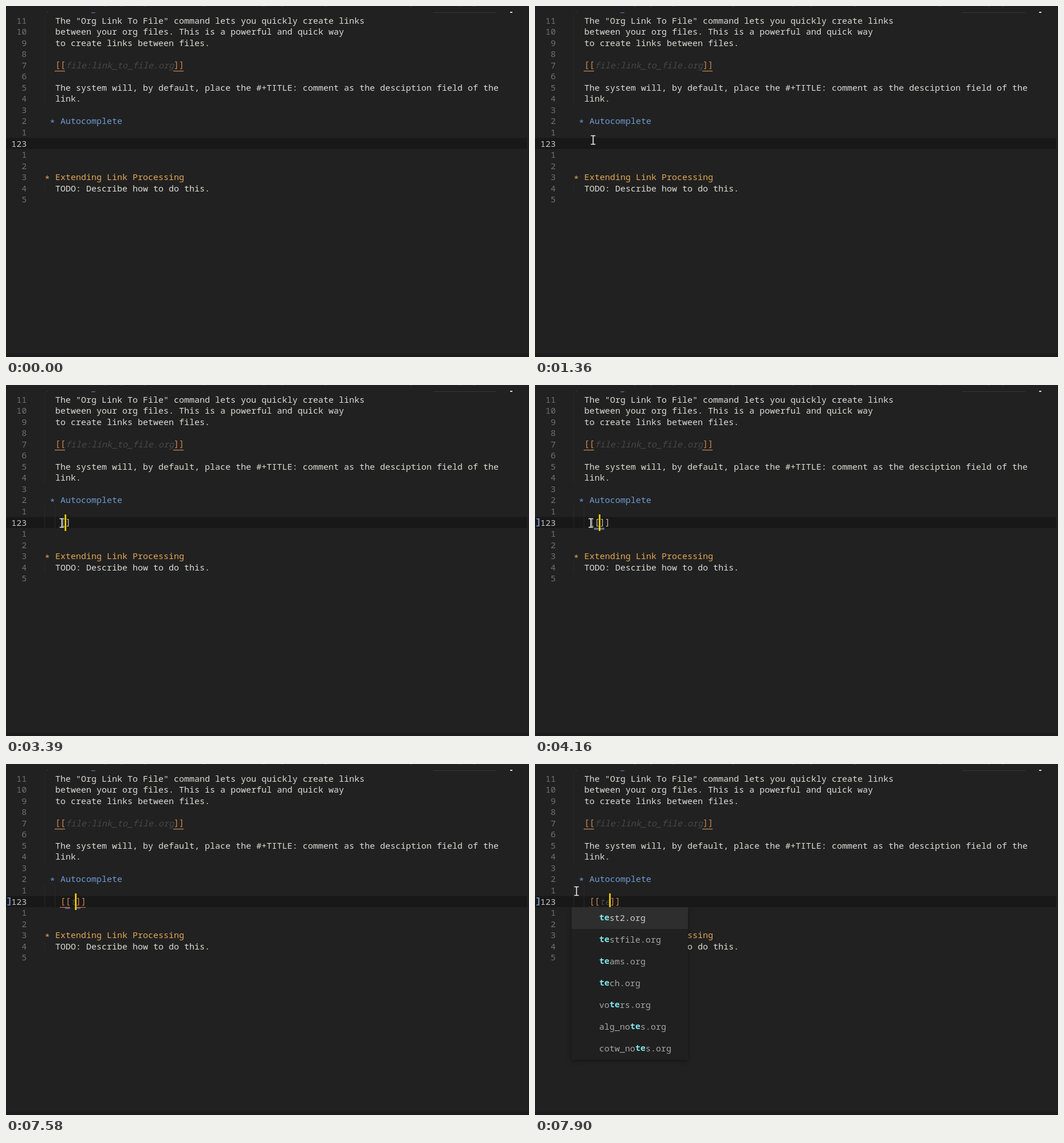
Recreate the animation shown at these times as an HTML page with a canvas. Size 913x613 px, loop 8 s.

```html
<!DOCTYPE html>
<html lang="en">
<head>
<meta charset="utf-8">
<title>Org link autocomplete</title>
<style>
html, body { margin: 0; width: 100%; height: 100%; overflow: hidden; background: #212121; }
canvas { display: block; }
</style>
</head>
<body>
<canvas id="stage" width="913" height="613"></canvas>
<script>
const ctx = document.getElementById('stage').getContext('2d');
const LOOP = 8000, CHAR = 9, LEFT = 68, ROW = 19.55, TOP = 15.4;
const FACE = '15px "Noto Sans Mono", "DejaVu Sans Mono", monospace';
const C = {
  bg: '#212121', line: '#181818', text: '#dcdcd8', num: '#707070', now: '#c6c6c6',
  blue: '#6f9ad3', gold: '#e3a857', link: '#d08a50', dim: '#484848', guide: '#2b2b2b',
  caret: '#ffd900', pair: '#c9c3b0', match: '#6f8fd8', hit: '#80e9ef', item: '#a6a6a6',
  mark: '#8099dc', warn: '#c4714c'
};

// Column, text, colour
const lines = [
  [2, 'The "Org Link To File" command lets you quickly create links', C.text],
  [2, 'between your org files. This is a powerful and quick way', C.text],
  [2, 'to create links between files.', C.text],
  null, null, null,
  [2, 'The system will, by default, place the #+TITLE: comment as the desciption field of the', C.text],
  [2, 'link.', C.text],
  null,
  [1, '* Autocomplete', C.blue],
  null, null, null, null,
  [0, '* Extending Link Processing', C.gold],
  [2, 'TODO: Describe how to do this.', C.text],
  null
];
const CUR = 11;

// Pointer stops: time, x, y. The pointer holds each place until the next.
const path = [
  [230, 497, 435], [300, 444.5, 415.5], [530, 350, 330], [590, 296, 289.5],
  [820, 130, 212], [900, 69, 190], [1130, 42, 200], [1200, 15, 214],
  [1280, 70, 228], [1360, 101, 234], [1440, 104, 237], [1520, 102, 239],
  [1600, 99, 240], [1680, 97, 241],
  [5430, 90, 235], [5500, 82, 228], [5570, 76, 224], [5640, 72, 222]
];

const wide = ['test2.org', 'testfile.org', 'teams.org', 'tech.org', 'todo.org', 'talks.org',
  'voters.org', 'alg_notes.org', 'org_mode_publishing_script.org', 'cotw_notes.org'];
const narrow = wide.filter(s => s.includes('te'));

const colX = c => LEFT + c * CHAR;
const rowY = r => TOP + r * ROW;
const baseY = r => rowY(r) + 15.1;

function box(x, y, w, h, color) {
  ctx.fillStyle = color;
  ctx.fillRect(x, y, w, h);
}

function write(s, x, y, color, style = '300') {
  ctx.font = style + ' ' + FACE;
  ctx.fillStyle = color;
  ctx.fillText(s, x, y);
}

function put(s, col, row, color, style) {
  write(s, colX(col), baseY(row), color, style);
}

// Stars sit on the middle of the line.
function putLine(col, s, color, row) {
  const star = s.startsWith('*');
  if (star) write('*', colX(col) - 0.5, baseY(row) + 3, color);
  put(star ? s.slice(1) : s, col + star, row, color);
}

function brackets(s, col, row, color) {
  write(s, colX(col), baseY(row) - 1.4, color);
}

function under(col, count, y, color) {
  box(colX(col) - 1, y, count * CHAR, 1.2, color);
}

function guide(col, row, count) {
  box(colX(col) - 0.8, rowY(row), 1, count * ROW, C.guide);
}

function page() {
  box(0, 0, 913, 613, C.bg);
  box(0, 607, 913, 6, '#1c1c1c');
  box(0, rowY(CUR), 909.5, ROW, C.line);
  box(912, 0, 1, 613, '#191919');
  for (const x of [172, 200, 240, 344, 448, 480, 556, 705, 790, 815])
    box(x, 0, 4, 1, '#3a3a3a');
  box(71, 10, 2, 2, '#303030');
  box(149, 11, 7, 1.5, '#4c678b');
  box(746, 11, 110, 1, '#373737');
  box(880, 10, 4, 2, '#d8d8d8');

  guide(0, 0, 8);
  guide(0, 15, 1);
  lines.forEach((l, r) => {
    const n = String(r === CUR ? 123 : Math.abs(CUR - r));
    write(n, 36.3 - n.length * CHAR, baseY(r), r === CUR ? C.now : C.num);
    if (l) putLine(...l, r);
  });
  brackets('[[', 2, 4, C.link);
  put('file:link_to_file.org', 4, 4, C.dim, 'italic 300');
  brackets(']]', 25, 4, C.link);
  under(2, 2, 113, C.link);
  under(25, 2, 113, C.link);
}

function bar(col) {
  box(colX(col) - 1.5, 226, 2.6, 29, C.caret);
}

function gutterMark() {
  box(5.6, 233, 2, 14, C.mark);
  box(2.6, 233, 3, 1.6, C.mark);
  box(2.6, 245.4, 3, 1.6, C.mark);
}

function entry(t) {
  if (t < 1840) return;
  if (t < 2610) {
    ctx.strokeStyle = '#a28b13';
    ctx.lineWidth = 1.2;
    ctx.strokeRect(94.6, 232, 8, 18);
    return;
  }
  if (t < 3390) return bar(3);

  guide(0, 10, 2);
  guide(2, 10, 2);
  if (t >= 3620) gutterMark();

  if (t < 3850) {
    brackets('[]', 3, CUR, C.pair);
    if (t >= 3710) under(3, 2, 251, C.match);
    bar(4);
  } else if (t < 7580) {
    brackets('[[]]', 3, CUR, C.pair);
    if (t < 4160) under(3, 2, 251, C.match);
    else {
      under(4, 2, 249.6, '#9c9682');
      under(4, 2, 251.4, C.match);
    }
    bar(5);
  } else {
    const typed = t < 7810 ? 't' : 'te', end = 5 + typed.length;
    brackets('[[', 3, CUR, C.link);
    put(typed, 5, CUR, C.dim, 'italic 300');
    brackets(']]', end, CUR, C.link);
    under(3, 2, 249.8, C.warn);
    under(end, 2, 249.8, C.warn);
    under(4, 1, 251.4, C.match);
    under(end, 1, 251.4, C.match);
    bar(end);
  }
}

function popup(items, key, right) {
  const x = 64, y = 250, h = 38.1, w = right - x;
  ctx.save();
  ctx.shadowColor = 'rgba(0,0,0,.36)';
  ctx.shadowBlur = 8;
  ctx.shadowOffsetY = 2;
  ctx.beginPath();
  ctx.rect(0, y, 913, 613);
  ctx.clip();
  box(x, y, w, items.length * h, '#202020');
  ctx.restore();
  box(x, y, w, h, '#2e2e2e');
  items.forEach((s, i) => {
    const at = s.indexOf(key), end = at + key.length, by = y + 23.6 + i * h;
    write(s.slice(0, at), 112, by, C.item);
    write(key, 112 + at * CHAR, by - 1, C.hit, '700');
    write(s.slice(end), 112 + end * CHAR, by, i ? C.item : '#cfcfcf');
  });
}

function ibeam(x, y) {
  ctx.beginPath();
  for (const s of [-1, 1]) {
    ctx.moveTo(x - 4, y + s * 7.5);
    ctx.lineTo(x + 4, y + s * 7.5);
  }
  ctx.moveTo(x, y - 7.5);
  ctx.lineTo(x, y + 7.5);
  for (const [w, color] of [[3.2, '#111'], [1.7, '#f0f0f0']]) {
    ctx.lineWidth = w;
    ctx.strokeStyle = color;
    ctx.stroke();
  }
}

function pointer(t) {
  const hidden = (t >= 7580 && t < 7660) || (t >= 7810 && t < 7900);
  const stop = path.filter(p => p[0] <= t).pop();
  if (stop && !hidden) ibeam(stop[1] + 0.5, stop[2]);
}

function draw(t) {
  page();
  entry(t);
  if (t >= 7900) popup(narrow, 'te', 267);
  else if (t >= 7660) popup(wide, 't', 412);
  pointer(t);
}

let start = null;
function tick(now) {
  if (start === null) start = now;
  draw((now - start) % LOOP);
  requestAnimationFrame(tick);
}
draw(0);
requestAnimationFrame(tick);
</script>
</body>
</html>
```
